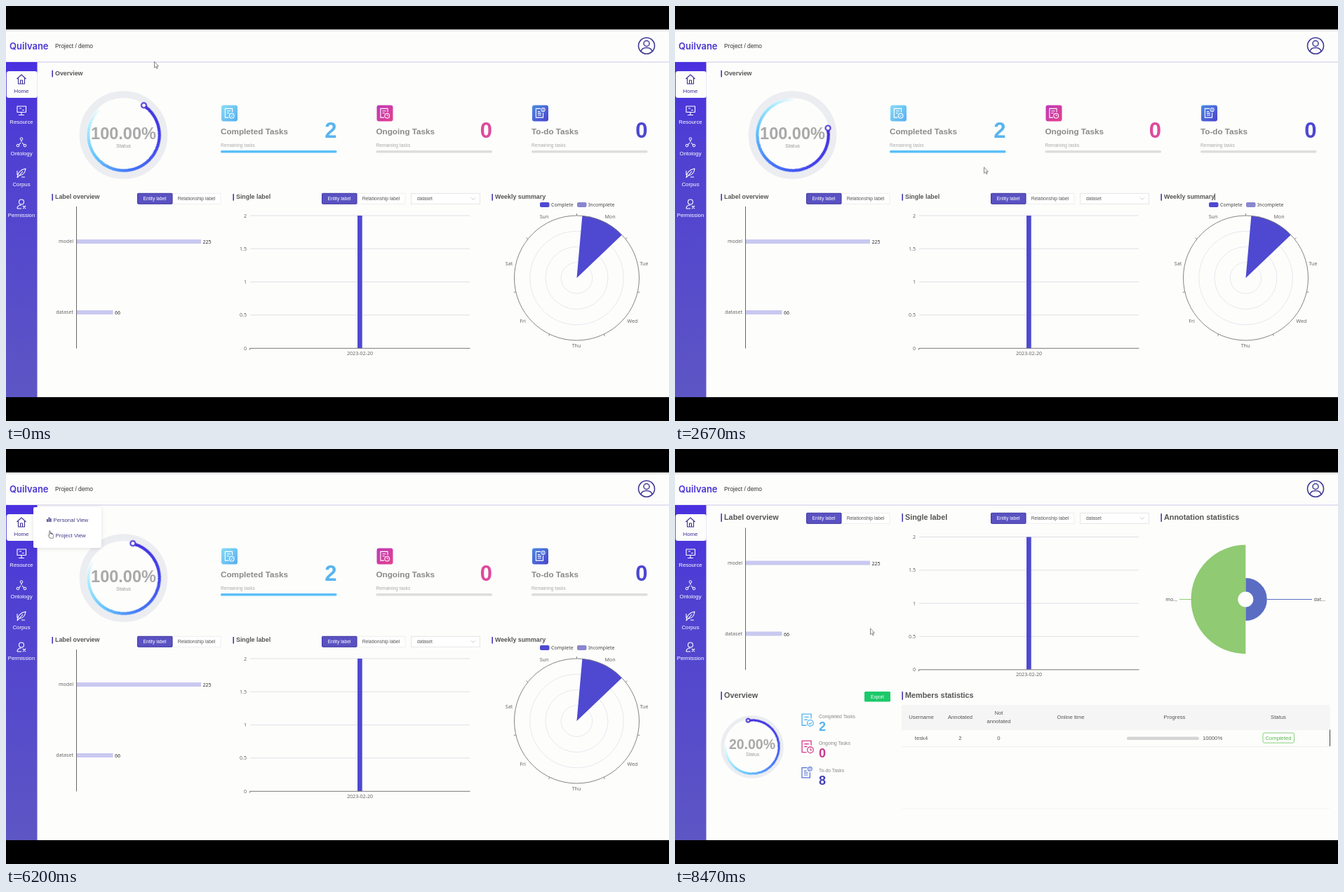
Recreate the animation shown at these times as an HTML page. Size 945x592 px, loop 8.54 s.

```html
<!DOCTYPE html>
<html lang="en">
<head>
<meta charset="utf-8">
<title>Dashboard</title>
<style>
@property --n { syntax: "<integer>"; inherits: false; initial-value: 0; }

html, body { margin: 0; width: 100%; height: 100%; overflow: hidden; background: #000; }
#stage { position: relative; width: 945px; height: 592px; overflow: hidden; font-family: "Liberation Sans", Arial, sans-serif; }
#stage > *, .page > svg { position: absolute; left: 0; top: 0; }
svg { display: block; }
.chart { font-family: "Noto Sans", sans-serif; }
.page { width: 945px; height: 592px; }

/* every animation shares the loop length */
.page, .caret, .turn, .across, .up, .count, .count::after, .slice, .tag,
#load, #popup, #cursor, .arrow, .hand { animation: 8540ms linear infinite; }

#personal { animation-name: leave; animation-timing-function: step-end; }
#project { animation-name: enter; animation-timing-function: step-end; }
@keyframes leave { 0% { visibility: visible } 78.6%, 100% { visibility: hidden } }
@keyframes enter { 0% { visibility: hidden } 78.6%, 100% { visibility: visible } }

.caret { animation-timing-function: step-end; }
#personal .caret { animation-name: blinkA; }
#project .caret { animation-name: blinkB; }
@keyframes blinkA { 0% { opacity: 0 } 29% { opacity: 1 } 52.7%, 100% { opacity: 0 } }
@keyframes blinkB { 0% { opacity: 0 } 95%, 100% { opacity: 1 } }

.turn { position: absolute; width: calc(2 * var(--r)); height: calc(2 * var(--r)); }
.arc { position: absolute; inset: 0; border-radius: 50%;
  background: conic-gradient(#4330dc, #4343ea 70deg, #4478f8 140deg, #66c4fc 200deg, #a6e9fd 245deg, #d8f6ff00 285deg);
  mask: radial-gradient(closest-side, #0000 calc(100% - var(--w) - .5px), #000 calc(100% - var(--w))); }
.knob { position: absolute; left: 50%; top: calc(var(--w) / 2); width: var(--k); height: var(--k); box-sizing: border-box;
  border: 2.1px solid #4633d6; border-radius: 50%; background: #fff; transform: translate(-50%, -50%); }
#personal .turn { animation-name: turnA; }
#project .turn { animation-name: turnB; }
@keyframes turnA {
  0% { rotate: 34deg } 9.37% { rotate: -55.7deg } 31.26% { rotate: -281deg }
  51.52% { rotate: -490.3deg } 63.23% { rotate: -609.4deg } 100% { rotate: -986deg }
}
@keyframes turnB { 0% { rotate: 1008.2deg } 100% { rotate: -16.6deg } }

.across, .up { transform-box: fill-box; transform-origin: 0 100%; }
#project .across { animation-name: across; }
#project .up { animation-name: up; }
@keyframes across { 0%, 80% { transform: scaleX(0); animation-timing-function: cubic-bezier(.33,1,.68,1) } 91.7%, 100% { transform: none } }
@keyframes up { 0%, 80% { transform: scaleY(0); animation-timing-function: cubic-bezier(.33,1,.68,1) } 91.7%, 100% { transform: none } }

.count { position: absolute; font: 7.1px/10px "Noto Sans", sans-serif; color: #333; }
.count::after { --n: var(--to); counter-reset: n var(--n); content: counter(n); }
#project .count { animation-name: slide; }
#project .count::after { animation-name: tally; }
@keyframes slide { 0%, 80% { translate: calc(-1 * var(--w)) 0; animation-timing-function: cubic-bezier(.33,1,.68,1) } 91.7%, 100% { translate: 0 0 } }
@keyframes tally { 0%, 80% { --n: 0; animation-timing-function: cubic-bezier(.33,1,.68,1) } 91.7%, 100% { --n: var(--to) } }

.slice { fill: none; }
.first { animation-name: sweep; }
.second { animation-name: follow; }
@keyframes sweep { 0%, 80% { stroke-dasharray: .5 359.5; animation-timing-function: cubic-bezier(.65,0,.35,1) } 91.7%, 100% { stroke-dasharray: 180 180 } }
@keyframes follow {
  0%, 80% { stroke-dasharray: .5 359.5; stroke-dashoffset: 0; animation-timing-function: cubic-bezier(.65,0,.35,1) }
  91.7%, 100% { stroke-dasharray: 180 180; stroke-dashoffset: -180 }
}
.tag { animation-name: tag; }
@keyframes tag { 0%, 81% { opacity: 0 } 87%, 100% { opacity: 1 } }

#stage > #load { top: 34.5px; width: 945px; height: 2px; background: #5b50b5; transform-origin: 0 0; animation-name: load; }
@keyframes load {
  0%, 76% { transform: scaleX(0); opacity: 1 } 79%, 81.5% { transform: none; opacity: 1 }
  83%, 100% { transform: none; opacity: 0 }
}

#stage > #popup { left: 39px; top: 83px; width: 97px; height: 58px; background: #fff; border-radius: 2px; box-shadow: 0 1px 6px #0000001c; animation-name: popup; }
@keyframes popup {
  0%, 7.96% { opacity: 0 } 10.77%, 17.56% { opacity: 1 } 20.5%, 52.1% { opacity: 0 }
  55%, 82% { opacity: 1 } 85%, 100% { opacity: 0 }
}

#cursor { width: 16px; height: 16px; animation-name: roam; animation-timing-function: ease-in-out; }
@keyframes roam {
  0% { translate: 211px 79px } 9.37%, 15% { translate: 25px 112px }
  28.1%, 41% { translate: 440px 229.5px } 50.3%, 51.52% { translate: 32.5px 112.5px }
  63.23%, 70.3% { translate: 33px 114px } 75%, 77.3% { translate: 88px 118px }
  79.63% { translate: 138px 161px } 90.2%, 100% { translate: 278px 255.5px }
}
.arrow, .hand { animation-timing-function: step-end; }
.arrow { animation-name: arrow; }
.hand { animation-name: hand; }
@keyframes arrow { 0% { opacity: 1 } 8.2% { opacity: 0 } 17.5% { opacity: 1 } 49.8% { opacity: 0 } 78.5%, 100% { opacity: 1 } }
@keyframes hand { 0% { opacity: 0 } 8.2% { opacity: 1 } 17.5% { opacity: 0 } 49.8% { opacity: 1 } 78.5%, 100% { opacity: 0 } }
</style>
</head>
<body>
<div id="stage">
  <svg id="frame" width="945" height="592"></svg>
  <div id="personal" class="page"></div>
  <div id="project" class="page"></div>
  <div id="load"></div>
  <div id="popup">
    <svg width="97" height="58" font-size="7.8" fill="#3f3a85">
      <path d="M19 17h1.7v4H19zM21.6 14.5h1.7V21h-1.7zM24 16h1.5v5H24zM22.5 37.5h1.5v-1h2.500v1h1.500v6h-5.500z"/>
      <text x="28.500" y="20.500">Personal View</text>
      <text x="31.500" y="43">Project View</text>
    </svg>
  </div>
  <svg id="cursor" width="16" height="16" fill="#fff" stroke="#666" stroke-width=".8" stroke-linejoin="round">
    <path class="arrow" d="M.5.5v8.600l2-1.800 1.400 3 1.300-.6-1.400-2.900h2.700z"/>
    <path class="hand" d="M2 .8q1-.6 1.400.4v3.400l3.800 1q1 .4.8 1.500l-.7 4.200H3L.6 7.600q0-1 1.400-.4z"/>
  </svg>
</div>
<script>
const $ = id => document.getElementById(id);
const MID = 'text-anchor="middle"', END = 'text-anchor="end"', BOLD = 'font-weight="700"';
const BLUE = '#58b4ee', PINK = '#dd4a9c', INDIGO = '#4e49d0';

const text = (x, y, size, str, fill = '#555', more = '') =>
  `<text x="${x}" y="${y}" font-size="${size}" fill="${fill}" ${more}>${str}</text>`;
const rect = (x, y, w, h, fill, more = '') =>
  `<rect x="${x}" y="${y}" width="${w}" height="${h}" fill="${fill}" ${more}/>`;
const path = (d, stroke, width = 1, more = '') =>
  `<path d="${d}" fill="none" stroke="${stroke}" stroke-width="${width}" ${more}/>`;
const ring = (x, y, r, stroke, width = 1, more = '') =>
  `<circle cx="${x}" cy="${y}" r="${r}" fill="none" stroke="${stroke}" stroke-width="${width}" ${more}/>`;
const svg = body => `<svg width="945" height="592">${body}</svg>`;

const heading = (x, y, size, str) =>
  rect(x, y - size * .82, 1.6, size * 1.08, '#4338b0') + text(x + 4.6, y, size, str, '#555', BOLD);

const gauge = (x, y, r, w, knob) =>
  `<div class="turn" style="left:${x - r}px;top:${y - r}px;--r:${r}px;--w:${w}px;--k:${knob}px">
    <i class="arc"></i><i class="knob"></i></div>`;

const count = (x, y, to, w) =>
  `<div class="count" style="left:${x}px;top:${y - 5}px;--to:${to};--w:${w}px"></div>`;

// document glyph with a small badge: check, clock or note
function sheet(x, y, scale, color, kind) {
  const note = kind === 2;
  const page = note ? 'M9 1H1v15h12V8M4 6h4M4 9h6M4 12h6' : 'M13 7V1H1v15h6M4 5h6M4 8.5h4';
  const mark = ['M10 13l1.5 1.500 2.500-2.800', 'M12 10.800V13h2', 'M13 1.500v3'][kind];
  const badge = note ? ring(13, 3, 3, color, 1.2) : ring(12, 13, 4, color, 1.2);
  return `<g transform="translate(${x} ${y}) scale(${scale})">${path(page, color, 1.3)}${badge}${path(mark, color)}</g>`;
}

function toggles(x, y) {
  return rect(x + 50, y, 69, 15, '#fff', 'stroke="#ececec" stroke-width=".8"') +
    rect(x + .5, y, 49.500, 15, '#5a52c2', 'rx="1" stroke="#3d35a0"') +
    text(x + 25, y + 9.800, 6.8, 'Entity label', '#fff', MID) +
    text(x + 84.500, y + 9.800, 6.8, 'Relationship label', '#555', MID);
}

function controls(y) {
  return toggles(187, y) + toggles(450, y) +
    rect(577.5, y, 98, 15, '#fff', 'stroke="#e2e2e2" stroke-width=".8"') +
    text(586, y + 9.800, 6.7, 'dataset') + path(`M663 ${y + 6}l3 3 3-3`, '#bbb', .8);
}

// horizontal label bars and the single column chart
function charts(dy) {
  let s = '';
  [['model', 336, 178], ['dataset', 437, 52.5]].forEach(([name, y, w]) => {
    s += rect(100, y - 3, w, 6, '#c9c8f0', 'class="across"') + text(96, y + 2, 7.1, name, '#666', END);
  });
  s += path('M100.500 286V488.500', '#666');
  for (let i = 0; i < 5; i++) {
    const y = 299 + i * 47.3;
    s += text(343, y + 2.500, 7.1, 2 - i / 2, '#666', END);
    if (i < 4) s += path(`M348 ${y}H661`, '#e0e0e8');
  }
  s += rect(501, 299, 6.7, 189, INDIGO, 'class="up"') + path('M347.500 490.500V488.300H661.500', '#777') +
    text(504.5, 497.5, 7.1, '2023-02-20', '#666', MID);
  return `<g class="chart" transform="translate(0 ${dy})">${s}</g>`;
}
const counts = dy => count(280.5, 336 + dy, 225, 178) + count(155, 437 + dy, 66, 52.5);

function weekly() {
  const cx = 813.5, cy = 388, R = 89;
  const at = (deg, r) => {
    const a = deg * Math.PI / 180;
    return `${(cx + r * Math.sin(a)).toFixed(2)} ${(cy - r * Math.cos(a)).toFixed(2)}`;
  };
  let s = [1, 2, 3].map(i => ring(cx, cy, R * i / 4, '#e2e2ec', .8)).join('');
  s += `<path d="M${cx} ${cy}L${at(5.1, R)}A${R} ${R} 0 0 1 ${at(46.3, R)}z" fill="${INDIGO}"/>` + ring(cx, cy, R, '#777', .9);
  for (let i = 0; i < 7; i++) s += path(`M${at(i * 360 / 7, R)}L${at(i * 360 / 7, R + 3)}`, '#777', .9);
  [['Sun', 767, 303], ['Mon', 861, 303], ['Tue', 909.5, 369.5], ['Wed', 893, 451.5], ['Thu', 813, 487],
   ['Fri', 736.5, 451.5], ['Sat', 717, 369.5]].forEach(([d, x, y]) => s += text(x, y, 7.1, d, '#666', MID));
  s += rect(761, 280, 13.5, 7, INDIGO, 'rx="2"') + text(777, 286, 7, 'Complete', '#444') +
    rect(814, 280, 13.5, 7, '#8986cf', 'rx="2"') + text(830, 286, 7, 'Incomplete', '#444');
  return `<g class="chart">${s}</g>`;
}

function frame() {
  const icons = [
    'M15.500 104l6.500-6 6.500 6M17.500 103v8h9v-8M20.500 111v-5h3v5',
    'M16 143h12.500v8.500H16zM22 151.500v4M18 155.500h8M19 146h3M23 148.500h3',
    'M22 191v3M21 195l-3 3.500M23 195l3 3.500',
    'M16 245q1-11 12-13-1 9-9 10M16 245l8-9M16 241v-6M22 244h5',
    'M16 289q0-5 6-5M22 289h-6M24 285l4 4M28 285l-4 4'
  ];
  let s = rect(0, 33.5, 945, 524.5, '#fdfdfc') + path('M0 35.500H945', '#dedce2') + path('M0 80H945', '#dddaf0', 1.3) +
    `<linearGradient id="side" x2="0" y2="1"><stop stop-color="#4930e0"/><stop offset=".25" stop-color="#4f40d2"/>
     <stop offset="1" stop-color="#5d56c4"/></linearGradient>` +
    rect(0, 80, 44.5, 478, 'url(#side)') + rect(.8, 93, 44, 38, '#fdfdfc', 'rx="3.500"');
  ['Home', 'Resource', 'Ontology', 'Corpus', 'Permission'].forEach((name, i) => {
    const color = i ? '#fff' : '#3a2f95';
    s += path(icons[i], color, 1.1, 'stroke-linejoin="round"') + text(22, 124 + i * 44.3, 7.8, name, color, MID);
  });
  s += [[22, 189.5], [17, 199], [27, 199]].map(([x, y]) => ring(x, y, 1.8, '#fff')).join('') + ring(22, 279.5, 3.5, '#fff', 1.1);
  s += text(5, 62, 13, 'Quilvane', '#4a36d0', 'font-weight="600" font-family="Inter, sans-serif"') +
    text(70, 60.3, 8.4, 'Project / demo', '#333');
  s += ring(913, 56.8, 11.5, '#3f3a95', 1.6) + ring(913, 53.5, 4, '#3f3a95', 1.5) + path('M905 65q1-5.500 8-5.500t8 5.500', '#3f3a95', 1.5);
  return s;
}

function personal() {
  const cards = [
    ['Completed Tasks', 2, BLUE, '#86dcf5', '#58aef0', '#5cc0f8'],
    ['Ongoing Tasks', 0, PINK, '#bd39ba', '#e4418c', '#dedede'],
    ['To-do Tasks', 0, '#4d46d2', '#4a8ae2', '#4b43cd', '#dedede']
  ];
  let s = heading(65.4, 99, 8.9, 'Overview') + ring(167.5, 184, 57.8, '#ecedf1', 10) +
    text(167.5, 190, 23.5, '100.00%', '#a9a9a9', `${MID} ${BOLD}`) + text(167.5, 201.5, 7.4, 'Status', '#999', MID);
  cards.forEach(([name, n, color, a, b, bar], i) => {
    const x = 306 + i * 221.5;
    s += `<linearGradient id="card${i}" x2="1" y2="1"><stop stop-color="${a}"/><stop offset="1" stop-color="${b}"/></linearGradient>` +
      rect(x + 1, 141.5, 23, 23, `url(#card${i})`, 'rx="3"') + sheet(x + 5.500, 145.500, .85, '#fff', i) +
      text(x, 183, 11.7, name, '#8a8a8a', BOLD) + text(x + 165.500, 188.3, 31, n, color, `${END} ${BOLD}`) +
      text(x, 201, 6.6, 'Remaining tasks', '#aaa') + rect(x, 206, 165.5, 3.6, bar, 'rx="1.500"');
  });
  s += heading(65.4, 275.3, 8.85, 'Label overview') + heading(323.4, 275.3, 8.85, 'Single label') +
    heading(692.4, 275.3, 8.85, 'Weekly summary') + controls(267.3) + charts(0) + weekly() +
    path('M769.300 267.500v9.500', '#333', 1, 'class="caret"');
  return svg(s) + gauge(167.5, 184, 53, 4.2, 9) + counts(0);
}

function pie() {
  const slice = (outer, color, name) => {
    const r = (outer + 11) / 2;
    return ring(813.3, 214.5, r, color, outer - 11, `class="slice ${name}" pathLength="360" transform="rotate(-90 813.3 214.5)"`);
  };
  return slice(30.5, '#5a6dc3', 'first') + slice(77.8, '#90ca73', 'second') +
    `<g class="tag chart">${path('M719 214.500h17', '#90ca73')}${path('M844 214.500h64', '#5a6dc3')}` +
    text(716, 217, 7.1, 'mo...', '#555', END) + text(910.5, 217, 7.1, 'dat...') + '</g>';
}

function table() {
  const cell = (x, y, str) => text(x, y, 7.7, str, '#555', MID);
  let s = rect(323, 365, 610.5, 36, '#f5f5f6');
  [['Username', 351], ['Annotated', 406.5], ['Online time', 564], ['Progress', 712], ['Status', 860]]
    .forEach(([name, x]) => s += cell(x, 385, name));
  s += cell(461.5, 378.7, 'Not') + cell(461.5, 391, 'annotated') + cell(351, 414.5, 'tesk4') +
    cell(406.5, 414.5, 2) + cell(461.5, 414.5, 0) + rect(644, 410.6, 103, 4.5, '#d4d4d4', 'rx="2.200"') +
    text(752, 414.5, 7.7, '10000%') + rect(838, 405, 44.5, 14.2, '#fff', 'rx="2" stroke="#7cc96f" stroke-width=".9"') +
    text(860, 414.7, 7.7, 'Completed', '#55b548', MID);
  return s + path('M323 424.500H933', '#efeff1') + path('M323 513H933', '#f3f3f5');
}

function project() {
  let s = heading(65.4, 101, 10.85, 'Label overview') + heading(323.4, 101, 10.85, 'Single label') +
    heading(692.4, 101, 10.85, 'Annotation statistics') + heading(65.4, 355, 10.85, 'Overview') +
    heading(323.4, 355, 10.85, 'Members statistics') + controls(91.3) + charts(-173.5) + pie() + table();
  s += ring(110, 425, 42.2, '#ecedf1', 5) + text(110, 427.5, 19.5, '20.00%', '#a9a9a9', `${MID} ${BOLD}`) +
    text(110.5, 438, 6.7, 'Status', '#999', MID);
  s += rect(270, 346, 37, 14.5, '#1cc96a', 'rx="1.500"') + text(288.5, 355.5, 6.5, 'Export', '#fff', MID);
  [['Completed Tasks', 2, BLUE, BLUE], ['Ongoing Tasks', 0, '#c93a8c', '#d8408f'], ['To-do Tasks', 8, '#4540b8', '#5570d8']]
    .forEach(([name, n, color, icon], i) => {
      const y = 384 + i * 38.3;
      s += sheet(180, y - 7, i < 2 ? 1.08 : .95, icon, i) + text(205, y, 6.8, name, '#888') +
        text(205, y + 18, 18, n, color, BOLD);
    });
  s += path('M933.500 400.500v23.500', '#444', 1, 'class="caret"');
  return svg(s) + gauge(110, 425, 40, 3.2, 7.4) + counts(-173.5);
}

$('frame').innerHTML = frame();
$('personal').innerHTML = personal();
$('project').innerHTML = project();
</script>
</body>
</html>
```
